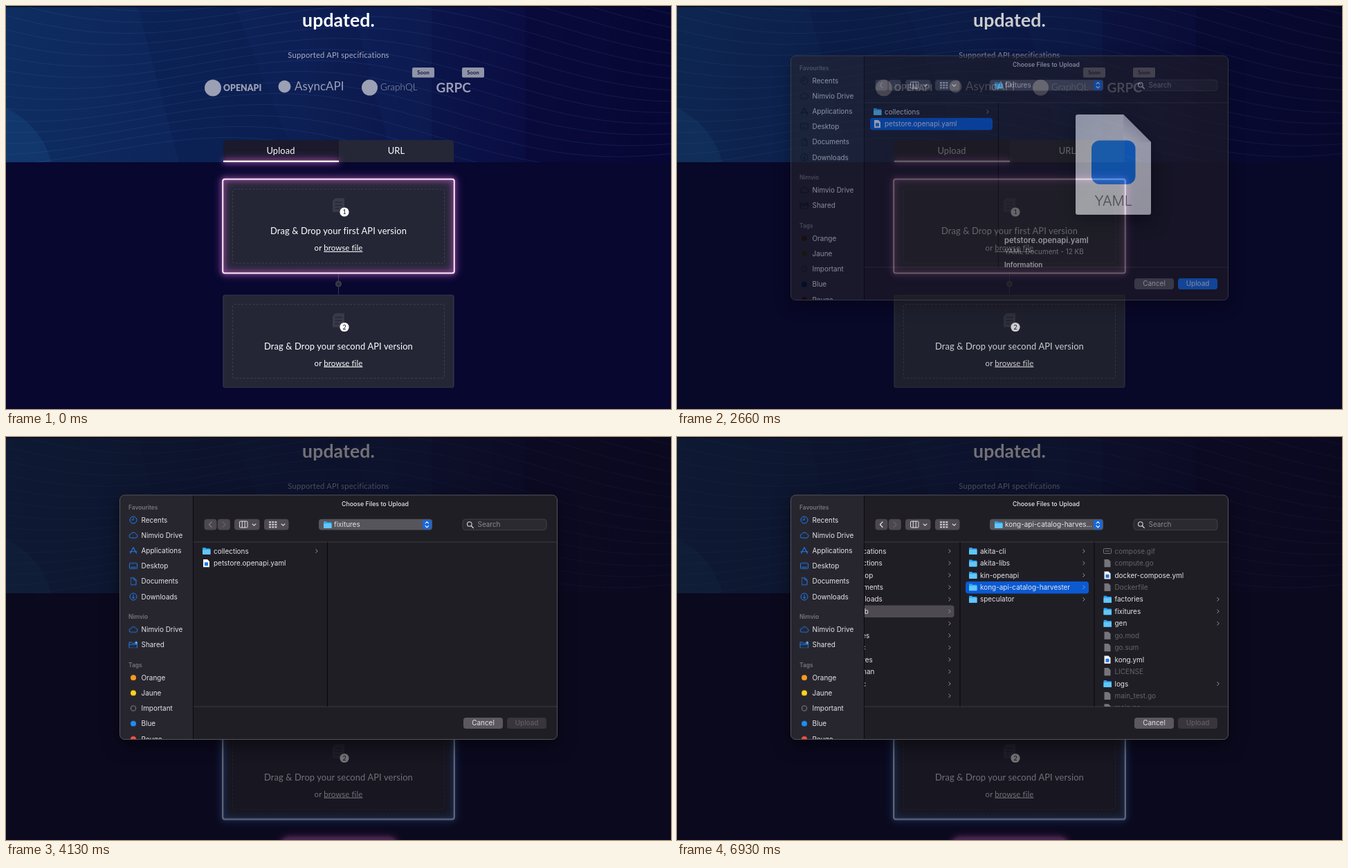
Animation, 961 px wide and 583 px high, one loop 8 s. Source, as an HTML page:

```html
<!DOCTYPE html>
<html lang="en">
<head>
<meta charset="utf-8">
<title>Choose API files</title>
<style>
html, body { margin: 0; width: 100%; height: 100%; overflow: hidden; background: #07072f; }
svg { display: block; width: 961px; height: 583px; }
text { white-space: pre; }
.av { font: 12.9px Lato, sans-serif; letter-spacing: .12px; fill: #fff; }
.ui { font: 9.95px Inter, sans-serif; fill: #e6e4ea; }
.mid { text-anchor: middle; }
.small { font-size: 11.4px; }
.head { font-size: 8.4px; font-weight: 600; fill: #77757e; }
.dim { fill: #66646b; }
.ln { fill: none; stroke-linecap: round; stroke-linejoin: round; }
.pink { filter: drop-shadow(0 0 3px #d36ad0) drop-shadow(0 0 6px #b04fb6); }
.blue { filter: drop-shadow(0 0 3px #3f8cff) drop-shadow(0 0 6px #2c6fe0); }
.shade { filter: drop-shadow(0 8px 12px rgba(0,0,0,.5)); }

#sheet, #dim, #card1, #ring1, #ring2, #thin2, #status, #cta, #menu, #cols { animation: 8s linear infinite; }
#sheet { animation-name: sheet; }
#dim { animation-name: dim; }
#card1 { animation-name: slide; }
#ring1 { animation-name: ring1; }
#ring2 { animation-name: ring2; }
#thin2 { animation-name: thin2; }
#status { animation-name: status; }
#cta { animation-name: cta; }
#menu { animation-name: menu; }
#cols { animation-name: cols; }
.picked, .preview, .early, .late, .before, .after, .ico, #hover { animation: 8s step-end infinite; }
.picked { animation-name: picked; }
.preview { animation-name: preview; }
.early { animation-name: early; }
.late { animation-name: late; }
.before { animation-name: before; }
.after { animation-name: after; }
.ico { animation-name: ico; }
#hover { animation-name: hover; }

@keyframes sheet {
  0%, 1.74% { opacity: 0; transform: translateY(-26px); }
  1.75% { opacity: .45; transform: translateY(-22px); }
  2.625% { opacity: .82; transform: translateY(-17.5px); }
  3.5% { opacity: .95; transform: translateY(-12px); }
  4.375% { opacity: 1; transform: translateY(-7px); }
  6.125%, 31.49% { opacity: 1; transform: translateY(0); }
  31.5% { opacity: .95; transform: translateY(-2px); }
  33.25% { opacity: .6; transform: translateY(-12px); }
  35.875%, 46.37% { opacity: 0; transform: translateY(-26px); }
  46.375% { opacity: .45; transform: translateY(-22px); }
  47.25% { opacity: .82; transform: translateY(-17.5px); }
  48.125% { opacity: .95; transform: translateY(-12px); }
  49% { opacity: 1; transform: translateY(-7px); }
  51.625%, 100% { opacity: 1; transform: translateY(0); }
}
@keyframes dim {
  0%, 1.74% { opacity: 0; }
  1.75% { opacity: .1; }
  2.625% { opacity: .25; }
  6.125%, 31.49% { opacity: 1; }
  31.5% { opacity: .9; }
  33.25% { opacity: .35; }
  35.875%, 46.37% { opacity: 0; }
  46.375% { opacity: .1; }
  47.25% { opacity: .25; }
  51.625%, 100% { opacity: 1; }
}
@keyframes slide {
  0%, 35% { transform: translateX(0); animation-timing-function: ease-in; }
  37.625% { transform: translateX(-53.5px); animation-timing-function: ease-out; }
  41.125%, 100% { transform: translateX(-110px); }
}
@keyframes ring1 { 0%, 34.5% { opacity: 1; } 37%, 100% { opacity: 0; } }
@keyframes ring2 { 0%, 37.6% { opacity: 0; } 42.875%, 100% { opacity: 1; } }
@keyframes thin2 { 0%, 35.5% { opacity: 0; } 37.5%, 100% { opacity: 1; } }
@keyframes status { 0%, 35% { opacity: 0; } 37%, 100% { opacity: 1; } }
@keyframes cta { 0%, 35.5% { opacity: 0; } 37.625% { opacity: .5; } 42%, 100% { opacity: 1; } }
@keyframes menu { 0%, 62.12% { opacity: 0; } 62.125% { opacity: .7; } 63%, 80.4% { opacity: 1; } 81.375%, 100% { opacity: 0; } }
@keyframes cols { 0%, 81.375% { transform: translateX(194px); animation-timing-function: ease-in-out; } 86.625%, 100% { transform: translateX(0); } }
@keyframes hover {
  0% { transform: translateY(0); }
  66.5% { transform: translateY(17.4px); }
  67.375% { transform: translateY(52.3px); }
  72.625% { transform: translateY(34.9px); }
  76.125%, 100% { transform: translateY(17.4px); }
}
@keyframes picked { 0% { opacity: 0; } 14.875% { opacity: 1; } 36%, 100% { opacity: 0; } }
@keyframes preview { 0% { opacity: 0; } 15.75% { opacity: 1; } 36%, 100% { opacity: 0; } }
@keyframes early { 0% { opacity: 1; } 81.375%, 100% { opacity: 0; } }
@keyframes late { 0% { opacity: 0; } 81.375%, 100% { opacity: 1; } }
@keyframes before { 0% { opacity: 1; } 35%, 100% { opacity: 0; } }
@keyframes after { 0% { opacity: 0; } 35%, 100% { opacity: 1; } }
@keyframes ico { 0% { filter: none; } 31.5% { filter: brightness(.15); } 36%, 100% { filter: none; } }
</style>
</head>
<body>
<svg id="stage" viewBox="0 0 961 583"></svg>
<script>
(() => {
const T = (x, y, s, cls = '', more = '') => `<text x="${x}" y="${y}" class="${cls}" ${more}>${s}</text>`;
const R = (x, y, w, h, fill, r = 0, more = '') =>
  `<rect x="${x}" y="${y}" width="${w}" height="${h}" rx="${r}" fill="${fill}" ${more}/>`;
const C = (x, y, r, fill, more = '') => `<circle cx="${x}" cy="${y}" r="${r}" fill="${fill}" ${more}/>`;
const P = (d, color, w = 1, more = '') => `<path class="ln" d="${d}" stroke="${color}" stroke-width="${w}" ${more}/>`;
const F = (d, fill, more = '') => `<path d="${d}" fill="${fill}" ${more}/>`;
const G = (attrs, ...kids) => `<g ${attrs}>${kids.join('')}</g>`;
const each = (list, fn) => list.map(fn).join('');
const rowY = i => 165 + 17.45 * i;

const defs = `<defs>
<linearGradient id="sky"><stop offset="0" stop-color="#0e2d61"/><stop offset=".45" stop-color="#0d1f54"/>
<stop offset=".78" stop-color="#0a0d42"/><stop offset="1" stop-color="#080738"/></linearGradient>
<linearGradient id="paper" x2="1" y2="1"><stop offset="0" stop-color="#e6e6e7"/><stop offset=".5" stop-color="#f6f6f6"/>
<stop offset="1" stop-color="#ececed"/></linearGradient>
<linearGradient id="curl" x1=".2" y1="1" x2=".7" y2=".3"><stop offset="0" stop-color="#fff"/><stop offset="1" stop-color="#c4c4c8"/></linearGradient>
<clipPath id="hero"><rect width="961" height="226"/></clipPath>
<clipPath id="body"><rect x="271" y="152.5" width="526" height="237"/></clipPath>
<clipPath id="panel"><rect x="164.5" y="84" width="632" height="353.5" rx="7"/></clipPath>
</defs>`;

function wave(i) {
  let d = '';
  for (let x = 0; x <= 984; x += 24) {
    const y = -70 + i * 17 + 32 * Math.sin(x / 135 + i * .13) + x * .06;
    d += (x ? 'L' : 'M') + x + ' ' + y.toFixed(1);
  }
  return P(d, '#4478bd', .7, 'opacity=".24"');
}

const hero = G('clip-path="url(#hero)"',
  R(0, 0, 961, 226, 'url(#sky)'),
  F('M190 0H330L420 226H250Z', '#0a1c4a', 'opacity=".35"'),
  F('M500 0H615V226H560Z', '#10306a', 'opacity=".2"'),
  R(750, 0, 211, 226, '#07062e', 0, 'opacity=".35"'),
  '<ellipse cx="-60" cy="250" rx="128" ry="116" fill="#174a80" opacity=".35"/>',
  each([...Array(17).keys()], (_, i) => wave(i)),
  R(0, 0, 961, 1.3, '#05050f'));

const badge = x => R(x, 89, 32, 14.5, '#9094a8', 2) +
  T(x + 16, 98.8, 'Soon', 'av mid', 'style="font-size:7.6px;font-weight:700;fill:#15163a"');
const gray = '#9ba0b5';
const brand = (x, y, s, size, weight) => T(x, y, s, 'av', `style="font-size:${size}px;font-weight:${weight};fill:${gray};letter-spacing:0"`);

const masthead = [
  T(480.5, 30, 'updated.', 'av mid', 'style="font-size:26.6px;font-weight:700"'),
  T(480.5, 75.3, 'Supported API specifications', 'av mid', 'style="font-size:11.2px;fill:#a9aec2;letter-spacing:.2px"'),
  C(299, 118.5, 12, gray), brand(314, 122.5, 'OPENAPI', 12.4, 900),
  C(402.5, 116.5, 9, gray), brand(417, 122, 'AsyncAPI', 17, 400),
  C(525.5, 118, 11.5, gray), brand(541, 122, 'GraphQL', 13.6, 300),
  brand(621.5, 125, 'GRPC', 19, 700), badge(587), badge(659),
  F('M314 226V198a4 4 0 0 1 4-4H481V226Z', '#1a1a2c'),
  F('M481 226V194H643a4 4 0 0 1 4 4V226Z', '#252737'),
  T(397, 214, 'Upload', 'av mid'), T(564, 214, 'URL', 'av mid'),
  R(314, 223.6, 167, 2.2, '#fff', 0, 'class="pink"')].join('');

const card = (n, ...title) => [
  R(314, 251.5, 333, 134, '#242636', 2.5, 'stroke="#3c3f4e"'),
  R(327.5, 265, 306, 107, 'none', 2, 'stroke="#3c3f4c" stroke-dasharray="3 2.4"'),
  F('M476 278H489V298H472V282Z', '#383a48'),
  P('M476 284H485M476 288.5H485M476 293H481', '#242636', 1.4),
  C(489, 298, 6.6, '#fff'),
  T(489, 301.2, n, 'av mid', 'style="font-size:9px;fill:#14152c;letter-spacing:0"'),
  ...title,
  T(480.5, 354, 'or <tspan text-decoration="underline">browse file</tspan>', 'av mid small')].join('');
const title = (s, cls = '') => T(480.5, 330.3, s, 'av mid ' + cls);
const ring = (id, color, w, cls) => R(313.2, 250.6, 334.6, 136, 'none', 3, `id="${id}" class="${cls}" stroke="${color}" stroke-width="${w}"`);

const page = [
  R(0, 0, 961, 583, '#07072f'), hero, masthead,
  G('id="status"',
    C(583, 307, 12, '#1c1e30', 'stroke="#fff" stroke-width="2.4" class="blue"'),
    P('M579.5 307.2l2.4 2.4 4.6-4.8', '#fff', 1.3),
    T(583, 338, 'OpenAPI File', 'av mid small')),
  P('M480.5 387V417', '#383a48'), C(480.5, 402, 4.6, '#363842'), C(480.5, 402, 1.6, '#20212e'),
  G('id="card1"',
    card(1, title('Drag &amp; Drop your first API version', 'before'), title('petstore.openapi.yaml', 'after')),
    ring('ring1', '#fbeafb', 2, 'pink')),
  G('transform="translate(0 166.5)"',
    card(2, title('Drag &amp; Drop your second API version')),
    ring('thin2', '#6f93c4', 1.3, ''), ring('ring2', '#e9f2ff', 2, 'blue')),
  R(398, 580.5, 166, 20, '#9c4a9c', 10, 'id="cta" class="pink"'),
  R(0, 0, 961, 583, 'rgba(14,12,18,.58)', 0, 'id="dim"')].join('');

const B = '#1f7cf2';
const icons = {
  clock: C(0, 0, 5, 'none', `stroke="${B}"`) + P('M0-3V0H-2.4', B),
  cloud: P('M-3 4a2.7 2.7 0 0 1-.5-5.4a4 4 0 0 1 7.3-.3A2.9 2.9 0 0 1 3.4 4Z', B),
  apps: P('M-4.5 4L0-4.5L4.5 4M-5 1.5H5', B, 1.2),
  desk: R(-5.5, -4, 11, 8, 'none', 1, `stroke="${B}"`) + P('M-3.5 2H3.5', B),
  doc: P('M-3.5-5H.8L4-2V5H-3.5ZM.8-5V-2H4', B),
  down: C(0, 0, 5, 'none', `stroke="${B}"`) + P('M0-2.5V2.5M-2 .7L0 2.6L2 .7', B),
  share: P('M-6 4.5V-3.5H-2.5L-1.3-2H5.5V4.5ZM-6-.2H5.5', B) + C(4.2, -3, 1.8, '#5fb4ff'),
};
const dot = color => C(0, 0, 4, color);
const sideRow = ([y, name, icon]) => G(`class="ico" transform="translate(184 ${y})"`, icon) + T(195.5, y + 3.6, name, 'ui');
const sidebar = [
  T(177, 104.5, 'Favourites', 'ui head'), T(177, 262.7, 'Nimvio', 'ui head'), T(177, 332.7, 'Tags', 'ui head'),
  each([
    [120, 'Recents', icons.clock], [142, 'Nimvio Drive', icons.cloud], [164.3, 'Applications', icons.apps],
    [186.5, 'Desktop', icons.desk], [208.8, 'Documents', icons.doc], [231, 'Downloads', icons.down],
    [278.5, 'Nimvio Drive', icons.cloud], [300.5, 'Shared', icons.share],
    [348.2, 'Orange', dot('#fb9a1d')], [370.4, 'Jaune', dot('#fdd21c')],
    [392.5, 'Important', C(0, 0, 3.7, 'none', 'stroke="#85838b"')],
    [414.7, 'Blue', dot('#1d8ef5')], [436.9, 'Rouge', dot('#f0503f')]], sideRow)].join('');

const folder = (x, y) => F(`M${x} ${y - 4}a1 1 0 0 1 1-1h3l1.3 1.3h5.2a1 1 0 0 1 1 1V${y + 5}h-11.5Z`, '#2fa4ee') +
  R(x, y - 2, 11.5, 7, '#62c6fa', .8);
const sheetIcon = (x, y, fill) => F(`M${x + 1} ${y - 5.5}h6l3 3v8.2h-9Z`, fill);
const yaml = (x, y) => sheetIcon(x, y, '#f4f4f5') + R(x + 3, y - 1.2, 5, 5, '#1a78ec', 1);
const gif = (x, y) => R(x, y - 3.5, 11, 7, 'none', 1, 'stroke="#77757c"') + P(`M${x + 3} ${y}h5`, '#77757c');
const chev = (x, y, c = '#99979e') => P(`M${x - 1.2} ${y - 2.4}l2.4 2.4l-2.4 2.4`, c);

// kind: d folder, y yaml, g image, otherwise greyed out
function entry(x, i, name, kind, arrowX) {
  const y = rowY(i), ix = x - 16;
  const icon = kind == 'd' ? folder(ix, y) : kind == 'y' ? yaml(ix, y) : kind == 'g' ? gif(ix, y) : sheetIcon(ix, y, '#77757c');
  return icon + T(x, y + 3.6, name, 'ui ' + ('dy'.includes(kind) ? '' : 'dim')) + (kind == 'd' ? chev(arrowX, y) : '');
}
const column = (x, arrowX, list) => each(list, (s, i) => entry(x, i, s.slice(1), s[0], arrowX));
const split = x => P(`M${x} 152V390`, '#08070a');

const firstBrowse = G('class="early"', split(464.5),
  R(279, 174, 177, 17.6, '#0a5ad2', 4, 'class="picked"'),
  column(300, 449, ['dcollections', 'ypetstore.openapi.yaml']),
  G('class="preview"',
    F('M579 169H645L685 209V311a3 3 0 0 1-3 3H579a3 3 0 0 1-3-3V172a3 3 0 0 1 3-3Z', 'url(#paper)', 'class="shade"'),
    F('M645 169L685 209H649a4 4 0 0 1-4-4Z', 'url(#curl)'),
    R(599, 206.5, 63.5, 63.5, '#1683fa', 12),
    T(630.5, 301.3, 'YAML', 'ui mid', 'style="font-size:20.4px;font-weight:300;fill:#66666a;letter-spacing:-.3px"'),
    T(473, 355.4, 'petstore.openapi.yaml', 'ui', 'style="font-size:11.2px;font-weight:600"'),
    T(473, 371.4, 'YAML Document - 12 KB', 'ui', 'style="fill:#a3a1a8"'),
    T(473, 390.2, 'Information', 'ui', 'style="font-weight:600"')));

const secondBrowse = G('class="late"', G('id="cols"',
  R(220, 243.6, 180.5, 17.4, '#4d4b51', 4), R(417, 209, 178, 17.4, '#0a5ad2', 4),
  column(244.5, 394, ['Applications', 'Collections', 'Desktop', 'Documents', 'Downloads', 'GitHub', 'go',
    'Movies', 'Music', 'Pictures', 'Postman', 'Public', 'tmp'].map(s => 'd' + s)),
  column(438, 588, ['akita-cli', 'akita-libs', 'kin-openapi', 'kong-api-catalog-harvester', 'speculator'].map(s => 'd' + s)),
  column(632.5, 782, ['gcompose.gif', '-compute.go', 'ydocker-compose.yml', '-Dockerfile', 'dfactories', 'dfixitures', 'dgen',
    '-go.mod', '-go.sum', 'ykong.yml', '-LICENSE', 'dlogs', '-main_test.go', '-main.go']),
  split(409), split(603)));

const vee = x => P(`M${x - 2.4} 125.8l2.4 2.4l2.4-2.4`, '#e0dee4', 1.2);
const back = color => P('M297 122.8l-3.6 3.8l3.6 3.8', color, 1.1);
const tiles = each([0, 1, 2], c => each([0, 1, 2], r => R(380 + c * 4.2, 122 + r * 3.6, 3, 2.3, '#c9c7cd')));
const toolbar = [
  T(533.5, 100, 'Choose Files to Upload', 'ui mid', 'style="font-size:8.8px;font-weight:500"'),
  R(286.5, 118.8, 18, 15.6, '#4b494f', 4), R(305.8, 118.8, 18, 15.6, '#4b494f', 4),
  back('#85838a'), G('class="late"', back('#f0eef4')), P('M313.4 122.8l3.6 3.8l-3.6 3.8', '#77757c'),
  R(330, 118.8, 36.5, 15.6, '#4e4c52', 4), R(373, 118.8, 35.5, 15.6, '#4e4c52', 4),
  R(337.5, 122, 11.5, 9, 'none', 1, 'stroke="#e0dee4"'), P('M341.3 122V131M345.2 122V131', '#e0dee4'), vee(358.5),
  tiles, vee(400.5),
  R(452, 118.8, 164, 15.6, '#57555c', 4), folder(459, 127),
  T(474, 130.2, 'fixitures', 'ui early'), T(474, 130.2, 'kong-api-catalog-harves...', 'ui late'),
  R(602, 120, 12.6, 13.2, '#1668dc', 3), P('M606 125l2.3-2.5l2.3 2.5M606 128.4l2.3 2.5l2.3-2.5', '#fff', 1.1),
  R(660, 119, 121, 15.6, '#2c2a31', 4, 'stroke="#423f47"'),
  C(669.8, 126, 3.3, 'none', 'stroke="#d8d6dc" stroke-width="1.1"'), P('M672.3 128.5l3 3', '#d8d6dc', 1.2),
  T(681.5, 130.4, 'Search', 'ui', 'style="fill:#8a8890"')].join('');

const button = (x, s, fill, cls = '') => R(x, 406, 57, 16, fill, 4) + T(x + 28.5, 417.4, s, 'ui mid ' + cls);

const menuRow = (y, name, icon) => (icon || folder(463, y - .4)) + T(480, y + 3.5, name, 'ui');
const places = ['fixitures', 'kong-api-catalog-harvester', 'GitHub', 'bastienvorlaud', 'Users', 'Velmoran HD', 'Bastien’s Norvane Air'];
const placeIcon = {
  5: R(463.5, 210.5, 10.5, 9.5, '#c9c9cd', 1.2) + R(463.5, 217, 10.5, 3, '#8f8f95', 1),
  6: R(464.5, 230, 8.5, 5, '#2f7fe0', .6) + R(463, 235, 11.5, 1.2, '#b9b9be', .5),
};
const menu = G('id="menu"',
  R(444, 116.5, 226.5, 241.5, '#2a292f', 5, 'stroke="#5c5a61" class="shade"'),
  R(447.5, 119.9, 219.5, 17.4, '#0a5ad2', 3.5, 'id="hover"'),
  P('M451.3 128.8l2.2 2.8l4-6.2', '#fff', 1.3),
  each(places, (s, i) => menuRow(128.6 + 17.43 * i, s, placeIcon[i])),
  T(661, 184.6, '⇧⌘H', 'ui', 'text-anchor="end" style="fill:#77757c;font-family:Inter,\'DejaVu Sans\',sans-serif"'),
  P('M454 246H660', '#57555c'),
  T(462, 263, 'Recent Places', 'ui head'),
  each(['fixitures', 'logs', 'kin-openapi', 'speculator', 'akita-libs'], (s, i) => menuRow(276.8 + 17.43 * i, s)));

const sheet = G('id="sheet"',
  R(164.5, 84, 632, 353.5, '#201e25', 7, 'class="shade"'),
  G('clip-path="url(#panel)"', R(164, 83, 106.5, 356, '#27262f'), sidebar),
  P('M270.5 84V437', '#09080b'),
  P('M271 152H796M271 390H796', '#3d3b42'),
  toolbar,
  G('clip-path="url(#body)"', firstBrowse, secondBrowse),
  button(661, 'Cancel', '#5b595f'),
  button(724, 'Upload', '#38363c', 'dim'),
  G('class="picked"', button(724, 'Upload', '#1a70e4')),
  R(164.5, 84, 632, 353.5, 'none', 7, 'stroke="#55535a"'),
  menu);

document.getElementById('stage').innerHTML = defs + page + sheet;
})();
</script>
</body>
</html>
```
